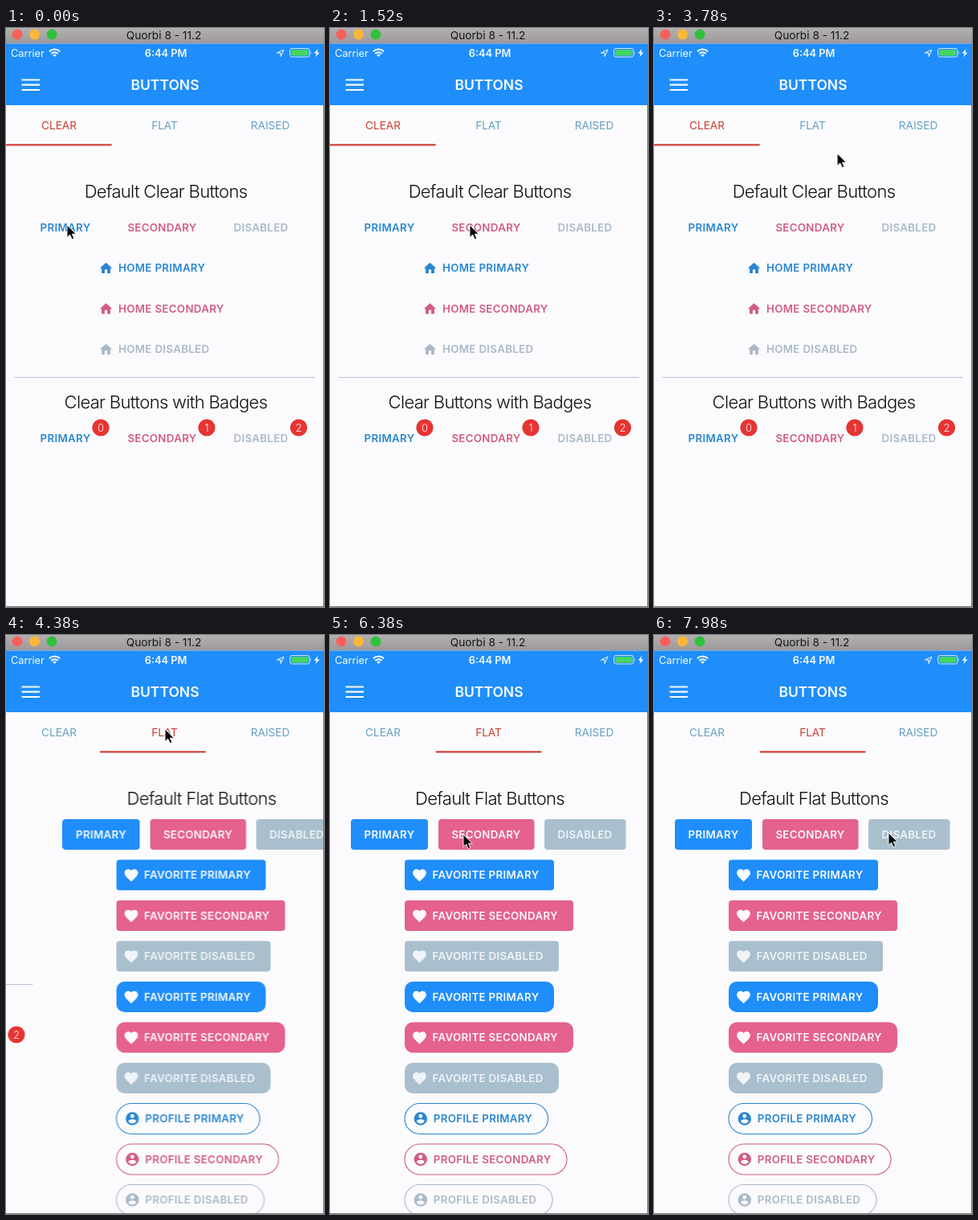
Write an HTML page that moves like this. It is 396 px wide and 720 px high and loops after 8000 ms.

```html
<!DOCTYPE html>
<html lang="en">
<head>
<meta charset="utf-8">
<title>Buttons</title>
<style>
  html, body { margin: 0; width: 100%; height: 100%; overflow: hidden; background: #fbfbfd; }
  svg { display: block; width: 100vw; height: 100vh; }
  text { font-family: Inter, Roboto, sans-serif; }

  .bar { font-size: 13.7px; fill: #161516; }
  .status { font-size: 12.8px; fill: #f6faff; }
  .header { font-size: 17.5px; font-weight: 600; fill: #f6faff; }
  .tab { font-size: 13.6px; fill: #659fc2; }
  .heading { font-size: 22px; font-weight: 300; letter-spacing: -.68px; fill: #101114; }
  .label { font-size: 13.3px; font-weight: 600; letter-spacing: .32px; }
  .badge { font-size: 13px; font-weight: 300; fill: #fff4f4; }
  .mid { text-anchor: middle; }

  .pages, .line, .cursor, .leave, .enter { animation: 8s linear infinite; }
  .pages { animation-name: slide; }
  .line { animation-name: underline; }
  .cursor { animation-name: point; }
  .leave { animation-name: deactivate; }
  .enter { animation-name: activate; }

  @keyframes slide {
    0% { transform: translateX(0); }
    52.44% { transform: translateX(0); animation-timing-function: cubic-bezier(.15, .45, .5, .85); }
    54.75% { transform: translateX(-351px); animation-timing-function: cubic-bezier(.1, .5, .25, 1); }
    59.75%, 100% { transform: translateX(-396px); }
  }
  @keyframes underline {
    0% { transform: translateX(0); }
    52.44% { transform: translateX(0); animation-timing-function: cubic-bezier(.15, .45, .5, .85); }
    54.75% { transform: translateX(116.8px); animation-timing-function: cubic-bezier(.1, .5, .25, 1); }
    59.75%, 100% { transform: translateX(131.7px); }
  }
  @keyframes deactivate {
    0%, 52.43% { fill: #cb3d30; }
    52.44%, 100% { fill: #659fc2; }
  }
  @keyframes activate {
    0%, 52.43% { fill: #659fc2; }
    52.44%, 100% { fill: #cb3d30; }
  }
  @keyframes point {
    0%, 3% { transform: translate(76px, 245px); animation-timing-function: ease-in-out; }
    8%, 20% { transform: translate(174px, 245px); animation-timing-function: ease-in-out; }
    27%, 42% { transform: translate(298px, 246px); animation-timing-function: ease-in-out; }
    50.5%, 56% { transform: translate(198px, 117px); animation-timing-function: ease-in-out; }
    63%, 71% { transform: translate(86.5px, 247px); animation-timing-function: ease-in-out; }
    77%, 87% { transform: translate(166px, 248px); animation-timing-function: ease-in-out; }
    94%, 100% { transform: translate(292px, 246px); }
  }
</style>
</head>
<body>
<svg viewBox="0 0 396 720" preserveAspectRatio="none">
  <defs>
    <linearGradient id="metal" x2="0" y2="1">
      <stop stop-color="#b3afb1"/>
      <stop offset="1" stop-color="#9c999b"/>
    </linearGradient>
    <path id="home" d="M10 20v-6h4v6h5v-8h3L12 3 2 12h3v8z"/>
    <path id="heart" d="M12 21.35l-1.45-1.32C5.4 15.36 2 12.28 2 8.5 2 5.42 4.42 3 7.5 3c1.74 0 3.41.81 4.5 2.09C13.09 3.81 14.76 3 16.5 3 19.58 3 22 5.42 22 8.5c0 3.78-3.4 6.86-8.55 11.54z"/>
    <path id="person" d="M12 2a10 10 0 1 0 0 20 10 10 0 1 0 0-20zm0 3a3 3 0 1 1 0 6 3 3 0 1 1 0-6zm0 14.2c-2.5 0-4.7-1.3-6-3.2 0-2 4-3.1 6-3.1s6 1.1 6 3.1c-1.3 1.9-3.5 3.2-6 3.2z" fill-rule="evenodd"/>
  </defs>

  <rect width="396" height="720" fill="#fbfbfd"/>
  <g class="pages">
    <g id="clear"></g>
    <g id="flat" transform="translate(396)"></g>
  </g>

  <rect width="396" height="19.5" fill="url(#metal)"/>
  <circle cx="14" cy="8" r="6.5" fill="#f9605a"/>
  <circle cx="35.5" cy="8" r="6.5" fill="#fbb735"/>
  <circle cx="57" cy="8" r="6.5" fill="#2fc23c"/>
  <text class="bar mid" x="196.5" y="13.5">Quorbi 8 - 11.2</text>

  <rect y="19.5" width="396" height="76.5" fill="#1f8efa"/>
  <text class="status" x="6" y="35.5">Carrier</text>
  <g fill="none" stroke="#f6faff" stroke-width="2">
    <path d="M53.8 29.2a9.5 9.5 0 0 1 13.4 0M56.3 32a6 6 0 0 1 8.4 0"/>
    <path d="M19.5 64.5h22.5M19.5 70.7h22.5M19.5 77h22.5" stroke-width="2.2"/>
  </g>
  <path d="M58.2 33.6a3.3 3.3 0 0 1 4.6 0L60.5 36z" fill="#f6faff"/>
  <text class="status mid" x="199" y="35.5" font-weight="600">6:44 PM</text>
  <path d="M337.5 31l8.5-4-4 8.5V31z" fill="none" stroke="#f6faff"/>
  <rect x="353.5" y="25.5" width="24.5" height="10.5" rx="2.5" fill="none" stroke="#cfe6fb"/>
  <rect x="355" y="27" width="21.5" height="7.5" rx="1.2" fill="#46d560"/>
  <path d="M379.5 29v4q1.5-2 0-4z" fill="#cfe6fb"/>
  <path d="M388.5 26l-5 5.5h3l-1 4.5 5-5.5h-3z" fill="#f6faff"/>
  <text class="header mid" x="198" y="77">BUTTONS</text>

  <text class="tab mid leave" x="66" y="126">CLEAR</text>
  <text class="tab mid enter" x="197.5" y="126">FLAT</text>
  <text class="tab mid" x="329" y="126">RAISED</text>
  <rect class="line" y="144.3" width="131.7" height="2.1" fill="#cf3a2e"/>

  <path d="M395.5 45V720M0 719.5H396" stroke="#75777c"/>
  <path class="cursor" d="M0 0v15.5l3.6-3.4 2.5 5.6 2.7-1.2-2.5-5.3h5z" fill="#080808" stroke="#fff" stroke-width=".9"/>
</svg>
<script>
  const kinds = ['PRIMARY', 'SECONDARY', 'DISABLED'];
  const fills = ['#1f8efa', '#e4628d', '#a9bfcd'];
  const inks = ['#2a86d2', '#d25c84', '#aab9c8'];
  const lights = ['#f8fbff', '#fff8fb', '#eff4f8'];
  const centers = [74, 194.5, 317.5];
  const rowY = row => 248 + 50.5 * row;

  const text = (cls, x, y, content, fill = '') =>
    `<text class="${cls}" x="${x}" y="${y}" ${fill && `fill="${fill}"`}>${content}</text>`;
  const heading = (y, content) => text('heading mid', 199, y, content);
  const label = (x, y, content, fill, cls = '') => text(`label ${cls}`, x, y + 4.9, content, fill);
  const icon = (name, x, y, scale, fill) =>
    `<use href="#${name}" fill="${fill}" transform="translate(${x} ${y}) scale(${scale}) translate(-12 -12)"/>`;
  const box = (x, y, width, radius, fill, stroke = 'none') =>
    `<rect x="${x}" y="${y - 19}" width="${width}" height="38" rx="${radius}" fill="${fill}" stroke="${stroke}" stroke-width="1.1"/>`;
  const badge = (x, y, count) =>
    `<circle cx="${x}" cy="${y}" r="10.6" fill="#e63432"/>` + text('badge mid', x, y + 4.7, count);
  const each = draw => kinds.map(draw).join('');

  const plainRow = y => each((kind, i) => label(centers[i], y, kind, inks[i], 'mid'));

  document.getElementById('clear').innerHTML =
    heading(210.8, 'Default Clear Buttons') + plainRow(rowY(0)) +
    each((kind, i) =>
      icon('home', 124.5, rowY(i + 1) + .3, .78, inks[i]) +
      label(140, rowY(i + 1), `HOME ${kind}`, inks[i])) +
    '<path d="M10 434.5H385" stroke="#b4c4d6"/>' +
    heading(472.8, 'Clear Buttons with Badges') + plainRow(509.7) +
    each((kind, i) => badge([118, 250, 364.5][i], 497, i));

  const solid = (first, radius) => each((kind, i) => {
    const y = rowY(first + i);
    return box(93, y, [186, 210, 192][i], radius, fills[i]) +
      icon('heart', 111.5, y + .3, .84, lights[i]) +
      label(127.5, y, `FAVORITE ${kind}`, lights[i]);
  });

  document.getElementById('flat').innerHTML =
    heading(210.8, 'Default Flat Buttons') +
    each((kind, i) =>
      box([26, 135, 267][i], rowY(0), [96, 119.5, 101.5][i], 4, fills[i]) +
      label(centers[i], rowY(0), kind, lights[i], 'mid')) +
    solid(1, 4) + solid(4, 10) +
    each((kind, i) => {
      const y = rowY(7 + i);
      return box(93, y, [178.5, 202, 184][i], 19, 'none', inks[i]) +
        icon('person', 112.8, y, .82, inks[i]) +
        label(128.8, y, `PROFILE ${kind}`, inks[i]);
    });
</script>
</body>
</html>
```
